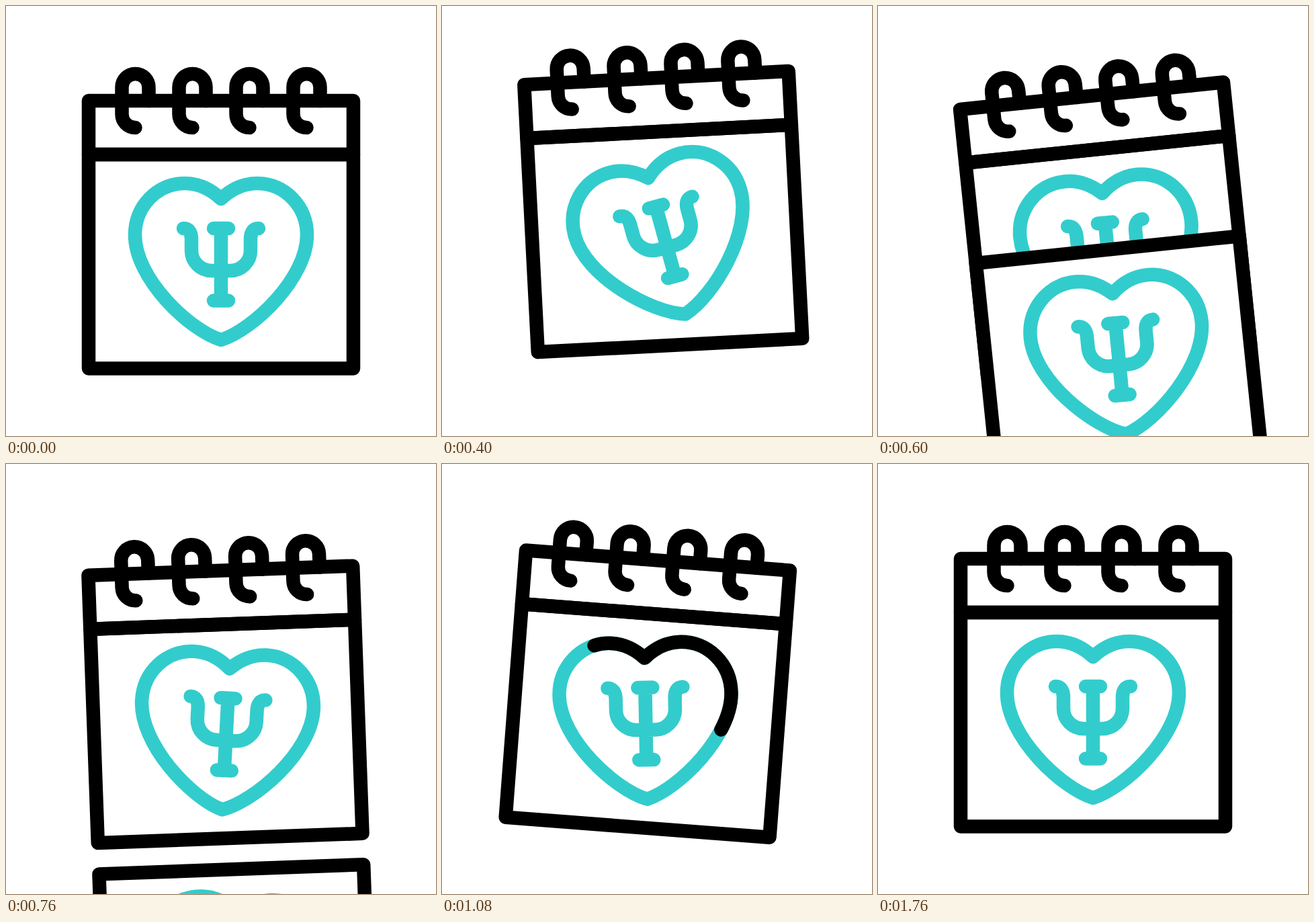
An HTML page for the animation above (2.04 s loop, 640 px wide and 640 px high).

```html
<!DOCTYPE html>
<html lang="en">
<head>
<meta charset="utf-8">
<title>Calendar</title>
<style>
  html, body { margin: 0; height: 100%; overflow: hidden; background: #fff; }
  svg { display: block; width: 100%; height: 100%; }
  g { fill: none; stroke: #000; stroke-width: 20.5; stroke-linecap: round; stroke-linejoin: round; }
  .teal { stroke: #3cc; }
</style>
</head>
<body>
<svg viewBox="0 0 640 640">
  <defs>
    <path id="ring" d="M212.5 141V121a20 20 0 0 0-40 0V161a20 20 0 0 0 20 20"/>
    <path id="outline" pathLength="1" d="M320 287C305 273 286 264 266 264C225 264 192 298 192 341C192 405 272 482 320 497C368 482 448 405 448 341C448 298 415 264 374 264C354 264 335 273 320 287Z"/>
  </defs>
  <g id="calendar">
    <g id="page">
      <rect x="123" y="221" width="394" height="318.5" fill="#fff"/>
      <g id="heart">
        <g class="teal">
          <use href="#outline"/>
          <path d="M309 331H331M320 331V438.5M309 438.5H331M264 331C272 331 276 337 276 347V364C276 381 290 394 306 394H334C350 394 364 381 364 364V347C364 337 368 331 376 331"/>
        </g>
        <use id="sweep" href="#outline"/>
      </g>
    </g>
    <use id="fallen" href="#page"/>
    <rect x="123" y="141" width="394" height="80"/>
    <use href="#ring"/>
    <use href="#ring" x="85"/>
    <use href="#ring" x="170"/>
    <use href="#ring" x="255"/>
  </g>
</svg>
<script>
const LOOP = 2040, STEP = 40;
const SWEEP_START = 0.697; // where on the heart outline the black stroke begins
const [calendar, heart, sweep, fallen] =
  ['calendar', 'heart', 'sweep', 'fallen'].map(id => document.getElementById(id));

// Eased value at time t through [time, value] keys.
function track(t, keys) {
  let [t0, v0] = keys[0];
  for (const [t1, v1] of keys) {
    if (t < t1) {
      const p = Math.max(0, (t - t0) / (t1 - t0));
      return v0 + (v1 - v0) * p * p * (3 - 2 * p);
    }
    [t0, v0] = [t1, v1];
  }
  return v0;
}

function draw(t) {
  const lift = track(t, [[0, 0], [400, -34], [800, 19.2], [1160, 0]]);
  const tilt = track(t, [[200, 0], [600, -5.9], [1000, 5], [1360, 0]]);
  const swing = track(t, [[40, 0], [380, -12.5], [720, 5.5], [1060, -5.5], [1360, 0]]);
  const drop = track(t, [[400, 0], [960, 515]]);
  const head = track(t, [[800, 0], [1440, 1]]);
  const tail = track(t, [[1160, 0], [1760, 1]]);
  const length = head - tail;

  calendar.setAttribute('transform', `translate(0 ${lift}) rotate(${tilt} 320 160)`);
  heart.setAttribute('transform', `rotate(${swing} 320 380)`);
  fallen.setAttribute('y', drop);
  fallen.style.display = drop > 0 && drop < 515 ? '' : 'none';
  sweep.style.display = length > 0 ? '' : 'none';
  sweep.style.strokeDasharray = `${length} ${1 - length}`;
  sweep.style.strokeDashoffset = -(SWEEP_START + tail);
}

const start = performance.now();
function frame() {
  const t = (performance.now() - start) % LOOP;
  draw(Math.floor(t / STEP) * STEP);
  requestAnimationFrame(frame);
}
frame();
</script>
</body>
</html>
```
